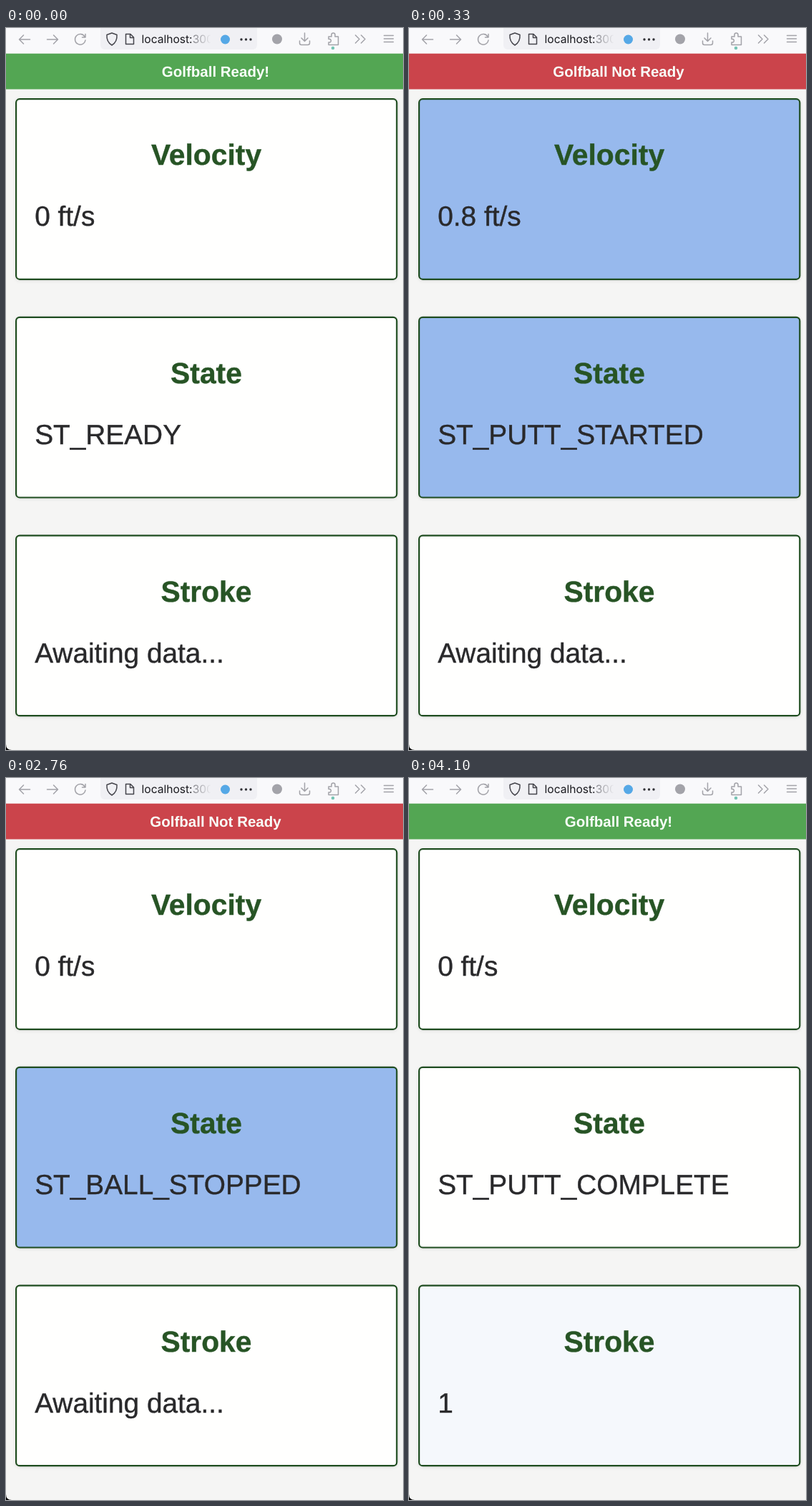
An HTML page that plays this animation: 555x1008 px, repeating every 4160 ms.

```html
<!DOCTYPE html>
<html lang="en">
<head>
<meta charset="utf-8">
<title>Golfball monitor</title>
<style>
  html, body { margin: 0; width: 100%; height: 100%; overflow: hidden; background: #f5f5f4; }
  svg { display: block; width: 100%; height: 100%; }
  text { font-family: "Liberation Sans", Arial, sans-serif; text-rendering: geometricPrecision; }
  .icons { fill: none; stroke: #a3a3a9; stroke-width: 1.5; stroke-linecap: round; stroke-linejoin: round; }
  .dark { stroke: #45454c; }
  .banner { font-size: 20.5px; font-weight: bold; fill: #f9fff9; text-anchor: middle; }
  .panel { stroke: #1f4d20; stroke-width: 2.2; filter: drop-shadow(0 1px 2px rgba(0, 0, 0, .1)); }
  .heading { font-size: 40.8px; font-weight: bold; fill: #275425; stroke: #275425; stroke-width: .4; text-anchor: middle; }
  .value { font-size: 38.8px; fill: #29292b; stroke: #29292b; stroke-width: .4; }
  .address { font-family: Inter, sans-serif; font-size: 15.6px; }
</style>
</head>
<body>
<svg viewBox="0 0 555 1008">
  <defs>
    <linearGradient id="fade" gradientUnits="userSpaceOnUse" x1="259" x2="287">
      <stop offset="0" stop-color="#77777d"/>
      <stop offset="1" stop-color="#77777d" stop-opacity="0"/>
    </linearGradient>
    <clipPath id="addressClip"><rect x="188" width="98" height="34"/></clipPath>
  </defs>
  <rect width="555" height="1008" fill="#f5f5f4"/>
  <rect width="555" height="36" fill="#f9f9fb"/>
  <rect x="132" y="-6" width="219" height="36" rx="6" fill="#f0f0f4"/>
  <g class="icons">
    <path d="M33.500 16H18.500M24.500 10L18.500 16L24.500 22"/>
    <path d="M57.500 16H72.500M66.500 10L72.500 16L66.500 22"/>
    <path d="M110 12A7.300 7.300 0 1 0 111 17M111 8.500V13H106.500"/>
    <path class="dark" d="M148 7L155 9.500C155.500 16 153 21 148 24C143 21 140.500 16 141 9.500Z"/>
    <path class="dark" d="M167.500 8.500H174L178.500 13V22.500H167.500ZM173.500 8.500V13.500H178.500"/>
    <path d="M417.500 7V18M413 14L417.500 18.500L422 14M410.500 18V21Q410.500 23.500 413 23.500H422Q424.500 23.500 424.500 21V18"/>
    <path d="M451 12H455V9.500A2.500 2.500 0 0 1 460 9.500V12H464.500V23.500H451V20H453A2.500 2.500 0 0 0 453 15.500H451Z"/>
    <path d="M488.500 10L494 15.500L488.500 21M496.500 10L502 15.500L496.500 21"/>
    <path d="M528.500 10.500H541.500M528.500 15H541.500M528.500 19.500H541.500"/>
  </g>
  <circle cx="379" cy="15.500" r="7" fill="#a3a3a9"/>
  <circle cx="306.500" cy="16" r="6.500" fill="#55a8e6"/>
  <circle cx="457" cy="28" r="2.300" fill="#76c4b4"/>
  <g fill="#303036">
    <circle cx="329" cy="16" r="1.700"/><circle cx="335.500" cy="16" r="1.700"/><circle cx="342" cy="16" r="1.700"/>
  </g>
  <text class="address" x="189.500" y="21.300" fill="#1b1b20" clip-path="url(#addressClip)">localhost:<tspan fill="url(#fade)">3000</tspan></text>
  <rect id="bannerBox" y="35.700" width="555" height="49.800"/>
  <text id="bannerText" class="banner" x="293" y="67.700"></text>
  <g id="cards"></g>
  <path d="M0 1000Q0 1008 8 1008H0Z"/>
</svg>
<script>
const LOOP = 4160, HOLD = 240, FADE = 740;
const BLUE = [151, 185, 237], WHITE = [255, 255, 254];

// Each track lists [start time, value]; flashes are the times a card lights up.
const cards = [
  { title: "Velocity", values: [[0, "0 ft/s"], [260, "0.8 ft/s"], [800, "0 ft/s"]], flashes: [260] },
  { title: "State",
    values: [[0, "ST_READY"], [300, "ST_PUTT_STARTED"], [800, "ST_PUTT_STOPPING"],
             [2760, "ST_BALL_STOPPED"], [3400, "ST_PUTT_COMPLETE"]],
    flashes: [300, 2760] },
  { title: "Stroke", values: [[0, "Awaiting data..."], [3400, "1"]], flashes: [3400] }
];
const readiness = [[0, true], [330, false], [3400, true]];

const byId = id => document.getElementById(id);
const valueAt = (track, t) => track.filter(([start]) => start <= t).pop()[1];

// CSS "ease": cubic-bezier(.25, .1, .25, 1)
function ease(x) {
  if (x <= 0) return 0;
  if (x >= 1) return 1;
  const bezier = (s, a, b) => 3 * s * (1 - s) ** 2 * a + 3 * s * s * (1 - s) * b + s ** 3;
  let low = 0, high = 1;
  for (let i = 0; i < 20; i++) {
    const mid = (low + high) / 2;
    if (bezier(mid, .25, .25) < x) low = mid; else high = mid;
  }
  return bezier(low, .1, 1);
}

function cardColor(flashes, t) {
  const start = flashes.filter(time => time <= t).pop() ?? -LOOP;
  const k = ease((t - start - HOLD) / FADE);
  return `rgb(${BLUE.map((c, i) => Math.round(c + (WHITE[i] - c) * k))})`;
}

byId("cards").innerHTML = cards.map(({ title }, i) => `
  <g transform="translate(0 ${i * 304.7})">
    <rect class="panel" x="14.1" y="99.2" width="532.2" height="251.6" rx="5"/>
    <text class="heading" x="280" y="191.2">${title}</text>
    <text class="value" x="40.2" y="276.2"></text>
  </g>`).join("");
cards.forEach((card, i) => {
  const group = byId("cards").children[i];
  card.panel = group.querySelector(".panel");
  card.label = group.querySelector(".value");
});

function draw(t) {
  const ready = valueAt(readiness, t);
  byId("bannerBox").setAttribute("fill", ready ? "#53a653" : "#cb444b");
  byId("bannerText").textContent = ready ? "Golfball Ready!" : "Golfball Not Ready";
  for (const { panel, label, values, flashes } of cards) {
    panel.setAttribute("fill", cardColor(flashes, t));
    label.textContent = valueAt(values, t);
  }
}

const begin = performance.now();
function tick() {
  draw((performance.now() - begin) % LOOP);
  requestAnimationFrame(tick);
}
tick();
</script>
</body>
</html>
```
